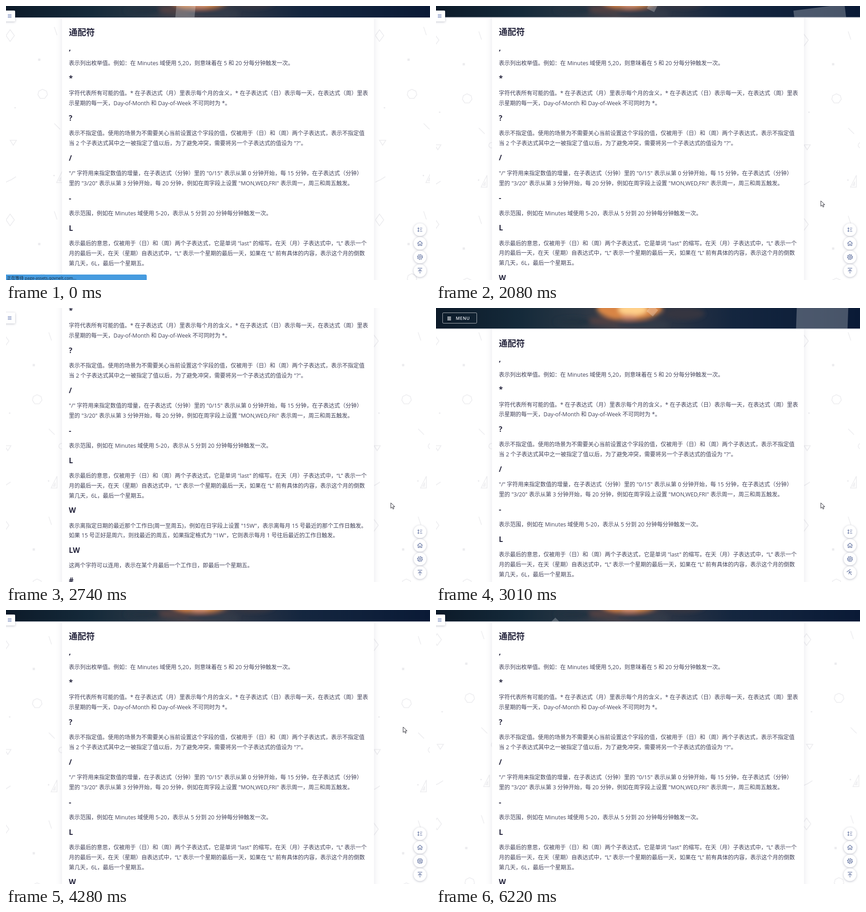
Animation, 931 px wide and 602 px high, one loop 6.29 s. Source, as an HTML page:

```html
<!DOCTYPE html>
<html lang="zh-CN">
<head>
<meta charset="utf-8">
<style>
  html, body { margin: 0; width: 100%; height: 100%; overflow: hidden; background: #fff; }
  svg { display: block; width: 931px; height: 602px; }
  text { font-family: "Open Sans", "Noto Sans CJK SC", "Noto Sans CJK", sans-serif; white-space: pre; }
  .body { font-size: 12.25px; fill: #42425a; }
  .head { font-size: 16px; font-weight: 700; fill: #25253d; }
  .lift { filter: drop-shadow(0 1px 2.5px rgba(40, 45, 80, .3)); }
  .icon { fill: none; stroke: #6474a2; stroke-width: 1.2; }
  .card { fill: #fff; filter: drop-shadow(0 0 7px rgba(40, 40, 80, .11)); }
</style>
</head>
<body>
<svg viewBox="0 0 931 602">
  <defs>
    <pattern id="doodles" width="811" height="405" patternUnits="userSpaceOnUse">
      <g id="tile" fill="none" stroke="#ebebee" stroke-width="1.5">
        <path d="M9 52L18.500 65 9 78 0 65ZM106 46l6 18M80 183l9 4 2 8-6 8-10 0-5-8 2-8ZM106 258l13 13M9 295h14l-7 11ZM0 387l8-4 3-1 11-7M124 362v26h-13ZM120 377v7h-4Z"/>
        <circle cx="134" cy="296" r="6"/>
        <path fill="#ebebee" stroke="none" d="M70.500 115.500h5v5h-5ZM18.500 222h3v3h-3ZM104 371h3v3h-3Z"/>
      </g>
    </pattern>
    <linearGradient id="sky">
      <stop offset="0" stop-color="#0c1a29"/>
      <stop offset=".2" stop-color="#152a3a"/>
      <stop offset=".34" stop-color="#293644"/>
      <stop offset=".45" stop-color="#4b4248"/>
      <stop offset=".55" stop-color="#2b3444"/>
      <stop offset=".7" stop-color="#14263f"/>
      <stop offset="1" stop-color="#0a1a36"/>
    </linearGradient>
    <clipPath id="headerClip"><rect y="-80" width="931" height="105"/></clipPath>
    <filter id="soft" x="-50%" y="-50%" width="200%" height="200%"><feGaussianBlur stdDeviation="5"/></filter>
  </defs>

  <rect width="931" height="602" fill="#fff"/>
  <rect id="backdrop" x="-20" y="-20" width="990" height="660" fill="url(#doodles)"/>

  <g id="page">
    <rect class="card" x="123" y="20" width="685" height="900"/>
    <g id="article"></g>
    <rect y="25" width="931" height="1.500" fill="#d5d7df"/>
    <g clip-path="url(#headerClip)">
      <rect y="-80" width="931" height="105" fill="url(#sky)"/>
      <g filter="url(#soft)">
        <ellipse cx="425" cy="-20" rx="72" ry="26" fill="#d98545"/>
        <ellipse cx="432" cy="-17" rx="32" ry="13" fill="#ffd08a"/>
        <ellipse cx="424" cy="0" rx="18" ry="6" fill="#d78a68"/>
        <ellipse cx="365" cy="8" rx="34" ry="8" fill="#4f3f43"/>
        <ellipse cx="455" cy="17" rx="58" ry="8" fill="#333a48"/>
        <ellipse cx="545" cy="-8" rx="45" ry="14" fill="#34343f"/>
        <ellipse cx="300" cy="10" rx="40" ry="9" fill="#20303f"/>
      </g>
      <g id="bubbles" fill="#fff" fill-opacity=".25"></g>
    </g>
  </g>

  <g id="tab">
    <path class="lift" fill="#fff" d="M-4 10h22q2 0 2 2v20q0 2-2 2h-22Z"/>
    <path d="M4 19h8M4 22h8M4 25h8" stroke="#4a62a6" stroke-width="1.2"/>
  </g>
  <g id="menu">
    <rect x="14.500" y="10.500" width="75" height="23" rx="2" fill="none" stroke="#fff" stroke-opacity=".65"/>
    <path d="M25 20h8M25 23h8M25 26h8" stroke="#fff" stroke-width="1.400"/>
    <text x="43.500" y="26" font-size="9.500" font-weight="600" letter-spacing=".6" fill="#e6e9ef">MENU</text>
  </g>

  <g id="status">
    <path d="M0 590h306q3 0 3 3v9H0Z" fill="#469bdf"/>
    <text x="2" y="601" font-size="9.200" fill="#16283a">正在等待 page-assets.qovnelt.com...</text>
  </g>

  <g id="buttons">
    <g transform="translate(909 491.500)"><path d="M-3.500-5V5M-5.500-3h4M-5.500 3h4M0-3.500h5M0 0h4M0 3.500h5"/></g>
    <g transform="translate(909 521.500)"><path d="M-5.500 0L0-5 5.500 0M-4-1V5h2.700V1.500h2.600V5H4V-1"/></g>
    <g transform="translate(909 551.500)"><g id="gear"><circle r="4.500"/><circle r="1.900"/><circle r="5.700" stroke-dasharray="2.240"/></g></g>
    <g transform="translate(909 581.500)"><path id="arrow" d="M-5-5.300H5M0 6V-2.500M-4 1.300L0-2.700 4 1.300"/></g>
  </g>

  <path id="cursor" d="M0 0V12l2.800-2.500 2 4.300 2-.9-2-4.200h3.900Z" fill="#fff" stroke="#22222c" stroke-width="1"/>
</svg>
<script>
const LOOP = 6290;
const $ = id => document.getElementById(id);

function add(parent, tag, attrs, text = '') {
  const el = document.createElementNS('http://www.w3.org/2000/svg', tag);
  for (const name in attrs) el.setAttribute(name, attrs[name]);
  el.textContent = text;
  return parent.appendChild(el);
}

const sections = [
  [',', '表示列出枚举值。例如：在 Minutes 域使用 5,20，则意味着在 5 和 20 分每分钟触发一次。'],
  ['*', '字符代表所有可能的值。* 在子表达式（月）里表示每个月的含义，* 在子表达式（日）表示每一天，在表达式（周）里表',
    '示星期的每一天，Day-of-Month 和 Day-of-Week 不可同时为 *。'],
  ['?', '表示不指定值。使用的场景为不需要关心当前设置这个字段的值，仅被用于（日）和（周）两个子表达式，表示不指定值',
    '当 2 个子表达式其中之一被指定了值以后，为了避免冲突，需要将另一个子表达式的值设为 "?"。'],
  ['/', '"/" 字符用来指定数值的增量，在子表达式（分钟）里的 "0/15" 表示从第 0 分钟开始，每 15 分钟，在子表达式（分钟）',
    '里的 "3/20" 表示从第 3 分钟开始，每 20 分钟，例如在周字段上设置 "MON,WED,FRI" 表示周一，周三和周五触发。'],
  ['-', '表示范围，例如在 Minutes 域使用 5-20，表示从 5 分到 20 分钟每分钟触发一次。'],
  ['L', '表示最后的意思，仅被用于（日）和（周）两个子表达式，它是单词 "last" 的缩写。在天（月）子表达式中，“L” 表示一个',
    '月的最后一天，在天（星期）自表达式中，“L” 表示一个星期的最后一天，如果在 “L” 前有具体的内容，表示这个月的倒数',
    '第几天，6L，最后一个星期五。'],
  ['W', '表示离指定日期的最近那个工作日(周一至周五)，例如在日字段上设置 "15W"，表示离每月 15 号最近的那个工作日触发。',
    '如果 15 号正好是周六，则找最近的周五，如果指定格式为 "1W"，它则表示每月 1 号往后最近的工作日触发。'],
  ['LW', '这两个字符可以连用，表示在某个月最后一个工作日，即最后一个星期五。'],
  ['#']
];

const article = $('article');
add(article, 'text', { class: 'head', x: 138, y: 64.5, style: 'font-size:19px' }, '通配符');
const early = add(article, 'g'), late = add(article, 'g');
let baseline = 130.3;
sections.forEach(([title, ...lines], i) => {
  const group = i < 6 ? early : late;
  add(group, 'text', { class: 'head', x: 138, y: baseline - 32.3 }, title);
  lines.forEach((line, n) => add(group, 'text', { class: 'body', x: 138, y: baseline + n * 21.85 }, line));
  baseline += (lines.length - 1) * 21.85 + 66;
});

for (const button of $('buttons').children) {
  const disc = add(button, 'circle', { r: 14, fill: '#fff', class: 'lift' });
  button.prepend(disc);
  button.lastElementChild.setAttribute('class', 'icon');
}

// x, size, reference time, centre y and angle at that time, rise in px/s, turn in deg/s
const bubbles = [
  [394.5, 42, 0, 7, 5, 28, 24],
  [475, 18, 1270, 16, 14, 17.5, 15],
  [848, 113, 3010, 0, 2, 64, 10],
  [262, 40, 6220, 45, 45, 28, 24]
].map(([x, size, ...motion]) => ({
  x, motion,
  el: add($('bubbles'), 'rect', { x: -size / 2, y: -size / 2, width: size, height: size })
}));

// Linear interpolation through [time, ...values] keys
function track(keys, t) {
  const i = keys.findIndex(k => k[0] > t);
  if (i < 1) return keys.at(i).slice(1);
  const a = keys[i - 1], b = keys[i], p = (t - a[0]) / (b[0] - a[0]);
  return a.slice(1).map((v, n) => v + (b[n + 1] - v) * p);
}

const scrollKeys = [[2080, 0], [2410, 109.5], [2600, 150], [2700, 153], [2760, 153],
  [3010, -20.3], [3070, -22], [3300, 0]];
const driftKeys = [[250, 0, 0], [800, -7, 7], [1270, -10, 9.3], [2000, -12, 10], [2410, -12, 9.5],
  [2740, -12, 7.5], [3300, -12, 7.5], [4280, -12, 11.5], [5400, -12, 10], [6220, -6.5, 0]];
const cursorKeys = [[300, 800, -16], [800, 860, 300], [1270, 870, 391], [2000, 845, 428],
  [3450, 845, 428], [4280, 872, 257], [5400, 872, 257], [5900, 700, 610]];
const swingKeys = [[2800, 0], [3010, -35], [3300, 25], [3700, -15], [4000, 8], [4280, 0], [4500, 4], [4650, 0]];

function move(el, x, y, angle = 0) {
  el.setAttribute('transform', `translate(${x} ${y}) rotate(${angle})`);
}
function show(el, on) {
  el.setAttribute('visibility', on ? 'visible' : 'hidden');
}

const start = performance.now();
function draw(now) {
  const t = Math.max(0, now - start) % LOOP;
  const [scroll] = track(scrollKeys, t);
  move($('page'), 0, -scroll);
  move($('backdrop'), 0, 0);
  $('doodles').setAttribute('patternTransform', `translate(${track(driftKeys, t).join(' ')})`);
  move($('cursor'), ...track(cursorKeys, t));
  move($('gear'), 0, 0, t * .18);
  move($('arrow'), 0, 0, track(swingKeys, t)[0]);
  for (const { el, x, motion: [at, y, angle, rise, turn] } of bubbles) {
    const s = (t - at) / 1000;
    move(el, x, y - rise * s, angle + turn * s);
  }
  show($('menu'), scroll < -10);
  show($('tab'), scroll >= -10);
  show($('status'), t < 1700);
  show(late, t >= 2080);
  requestAnimationFrame(draw);
}
requestAnimationFrame(draw);
</script>
</body>
</html>
```
